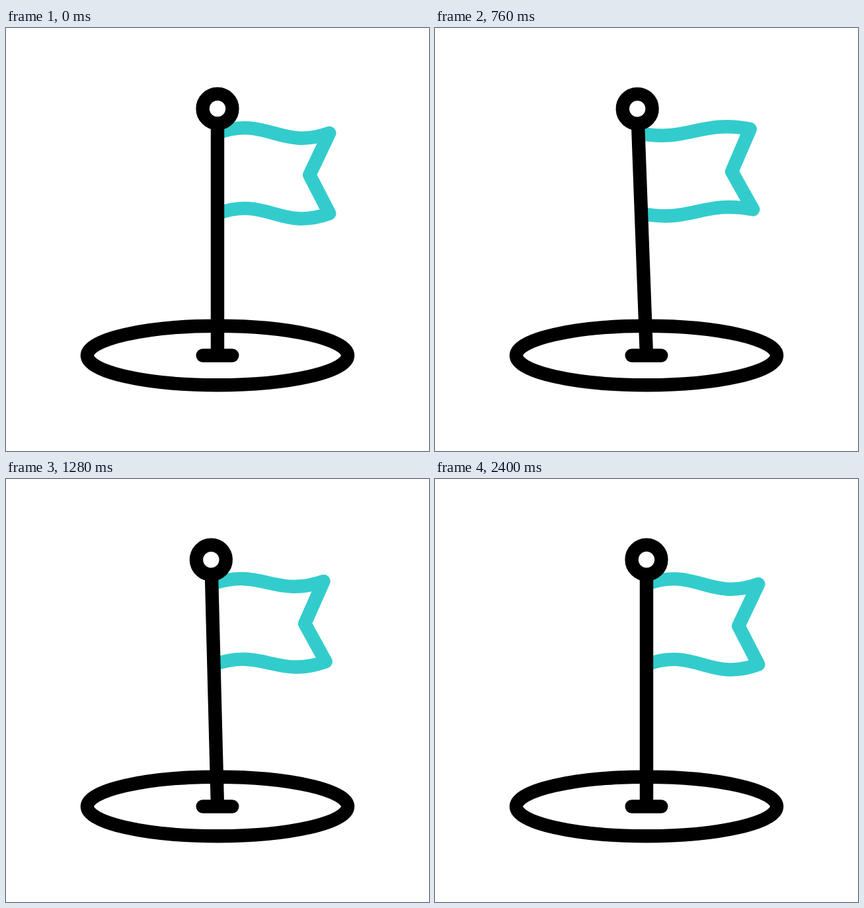
Animation of 640 by 640 pixels, one loop 3000 ms. Source, as an HTML page:

```html
<!DOCTYPE html>
<html lang="en">
<head>
<meta charset="utf-8">
<title>Flag</title>
<style>
  html, body { margin: 0; height: 100%; overflow: hidden; background: #fff; }
  svg { display: block; width: 100%; height: 100%; }
</style>
</head>
<body>
<svg viewBox="0 0 640 640" fill="none" stroke="#000" stroke-width="20.4" stroke-linecap="round" stroke-linejoin="round">
  <ellipse cx="320" cy="495.5" rx="197.1" ry="44.8"/>
  <g id="pole">
    <path id="flag" stroke="#3cc" stroke-linecap="butt"/>
    <path d="M320 144.5V495.5" stroke-linecap="butt"/>
    <circle cx="320" cy="122" r="22.4"/>
  </g>
  <path d="M297.7 495.5H342.3"/>
</svg>
<script>
const LOOP = 3000;
const pole = document.getElementById('pole');
const flag = document.getElementById('flag');

// Keys are [time in ms, value]
const tilt = [[0, 0], [600, -11], [900, 5], [1160, -3], [1400, 0]];
const wave = [[0, 27], [600, -27], [1200, 27], [1800, -27], [2400, 27]];

const ease = p => p * p * (3 - 2 * p);

function valueAt(keys, t) {
  const next = keys.findIndex(([time]) => time > t);
  if (next < 0) return keys[keys.length - 1][1];
  const [t0, a] = keys[next - 1];
  const [t1, b] = keys[next];
  return a + (b - a) * ease((t - t0) / (t1 - t0));
}

function draw(now) {
  const t = now % LOOP;
  const h = valueAt(wave, t);
  pole.setAttribute('transform', `rotate(${valueAt(tilt, t)} 320 495.5)`);
  flag.setAttribute('d',
    `M320 158.9c74.8 ${-h} 94.5 ${h} 169.3 0L459.2 222.3L489.3 280.7` +
    `c-74.8 ${h} -94.5 ${-h} -169.3 0`);
  requestAnimationFrame(draw);
}
draw(0);
</script>
</body>
</html>
```
